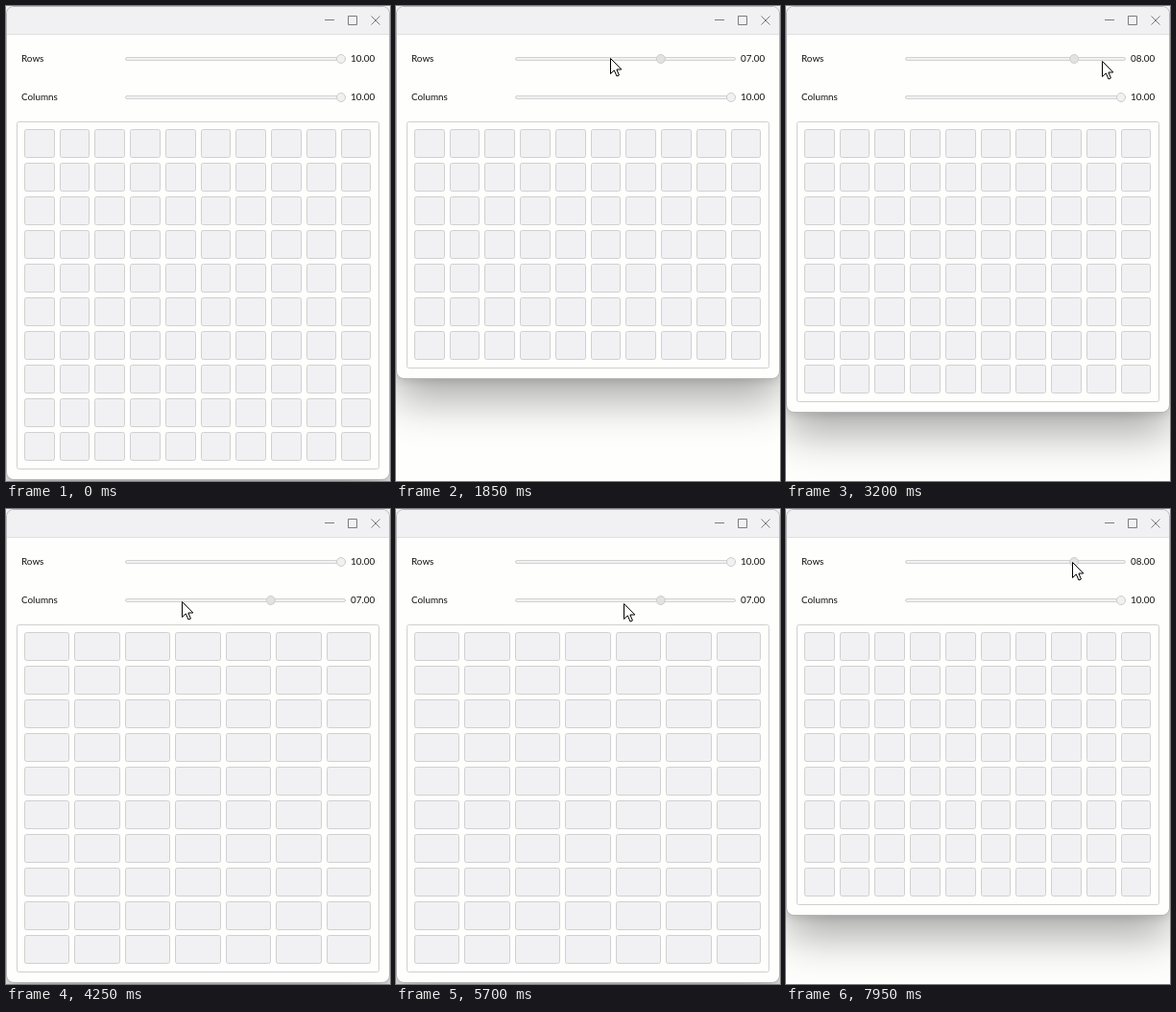
Recreate the animation shown at these times as an HTML page. Size 400 by 494 pixels, loop 8 s.

```html
<!DOCTYPE html>
<html lang="en">
<head>
<meta charset="utf-8">
<title>Rows and columns</title>
<style>
  html, body { margin: 0; width: 100%; height: 100%; overflow: hidden; background: #fefefd; }
  #win {
    position: absolute; left: 0; top: 0; width: 400px; box-sizing: border-box;
    border: 1px solid #b6b6b8; border-radius: 8px; background: #fefefd; overflow: hidden;
    box-shadow: 0 21px 46px rgba(0, 0, 0, .34), 0 2px 8px rgba(0, 0, 0, .12);
  }
  #bar { height: 28px; background: #f1f1f4; border-bottom: 1px solid #e0e0e2; }
  svg { position: absolute; left: 0; top: 0; }
  text { font: 9.9px Lato, "Open Sans", sans-serif; fill: #111; }
  .box { fill: #f1f1f4; stroke: #d0d0d0; }
  .track { fill: #f1f1f2; stroke: #d2d2d2; }
  .knob { stroke: #cdcdcd; }
  .icon { fill: none; stroke: #7c7c7e; }
</style>
</head>
<body>
<div id="win"><div id="bar"></div></div>
<svg id="stage" width="400" height="494" viewBox="0 0 400 494">
  <path class="icon" d="M332 14.5H342M356.5 10.5H365.5V19.5H356.5ZM380.5 10.5L389.5 19.5M389.5 10.5L380.5 19.5"/>
  <rect id="panel" x="11.5" y="120.5" width="377" rx="2" fill="none" stroke="#d0d0d0"/>
  <g id="cells"></g>
  <g id="sliders"></g>
  <path id="cursor" d="M.5 .5V16.5L4.3 12.9L7 19L9.4 18L6.9 12H11.8Z" fill="#fff" stroke="#000"/>
</svg>
<script>
const LOOP = 8000, STEP = 50, LAG = 150;
const FIRST = 129.4, PITCH = 24.4, MAX = 10;
const HOME = 347, LOW = 126;

// Where the pointer turns or rests: time, x, y
const turns = [
  [500, -14, 494], [1250, HOME, 52], [1400, HOME, 52],
  [2200, LOW, 55], [2300, LOW, 57], [3300, 352, 57],
  [3800, HOME, 92], [3960, HOME, 93], [4350, LOW, 97],
  [4700, LOW, 97], [5450, 286, 98], [6100, 159, 97],
  [6500, 345, 95], [6700, 364, 94],
  [7200, HOME, 54], [7400, HOME, 54], [7950, 298, 55]
];

const el = id => document.getElementById(id);
const clamp = (v, lo, hi) => Math.min(hi, Math.max(lo, v));

function add(parent, tag, attrs) {
  const node = document.createElementNS("http://www.w3.org/2000/svg", tag);
  for (const key in attrs) node.setAttribute(key, attrs[key]);
  return parent.appendChild(node);
}

function makeSlider(label, y) {
  const g = el("sliders");
  add(g, "text", { x: 16, y: y + 3 }).textContent = label;
  add(g, "rect", { class: "track", x: 124.5, y: y - 1.5, width: 229, height: 3, rx: 1.5 });
  const knob = add(g, "circle", { class: "knob", cy: y, r: 4.5 });
  const value = add(g, "text", { x: 359, y: y + 3 });
  return (n, active) => {
    knob.setAttribute("cx", FIRST + (n - 1) * PITCH);
    knob.setAttribute("fill", active ? "#e2e2e3" : "#f1f1f2");
    value.textContent = n.toFixed(2).padStart(5, "0");
  };
}

const setRows = makeSlider("Rows", 55);
const setCols = makeSlider("Columns", 95);

function pointer(t) {
  const i = Math.max(1, turns.findIndex(p => p[0] >= t));
  const [t0, x0, y0] = turns[i - 1], [t1, x1, y1] = turns[i];
  const k = clamp((t - t0) / (t1 - t0), 0, 1);
  return [x0 + (x1 - x0) * k, y0 + (y1 - y0) * k];
}

// The value follows the pointer with a short delay
const dragged = t => clamp(Math.round(1 + (pointer(t - LAG)[0] - FIRST) / PITCH), 1, MAX);

let shown = "";
function layout(rows, cols) {
  const key = rows + "x" + cols;
  if (key === shown) return;
  shown = key;
  el("win").style.height = 143 + 35 * rows + "px";
  el("panel").setAttribute("height", 11 + 35 * rows);
  const g = el("cells"), left = c => Math.round(19 + c * 367 / cols);
  g.replaceChildren();
  for (let r = 0; r < rows; r++) {
    for (let c = 0; c < cols; c++) {
      const x = left(c), end = Math.min(380, left(c + 1) - 5);
      add(g, "rect", {
        class: "box", x: x + .5, y: 128.5 + 35 * r, width: end - x - 1, height: 29, rx: 2
      });
    }
  }
}

function draw(time) {
  const t = Math.floor((time % LOOP) / STEP) * STEP;
  const within = (a, b) => t >= a && t < b;
  const rows = within(1400, 3500) || t >= 7400 ? dragged(t) : MAX;
  const cols = within(3960, 6800) ? dragged(t) : MAX;
  layout(rows, cols);
  setRows(rows, within(1200, 3400) || t >= 7150);
  setCols(cols, within(3750, 6800));
  const [x, y] = pointer(t).map(Math.round);
  el("cursor").setAttribute("transform", `translate(${x} ${y})`);
  el("cursor").setAttribute("visibility", t > 500 ? "visible" : "hidden");
}

const start = performance.now();
function tick() {
  draw(performance.now() - start);
  requestAnimationFrame(tick);
}
tick();
</script>
</body>
</html>
```
